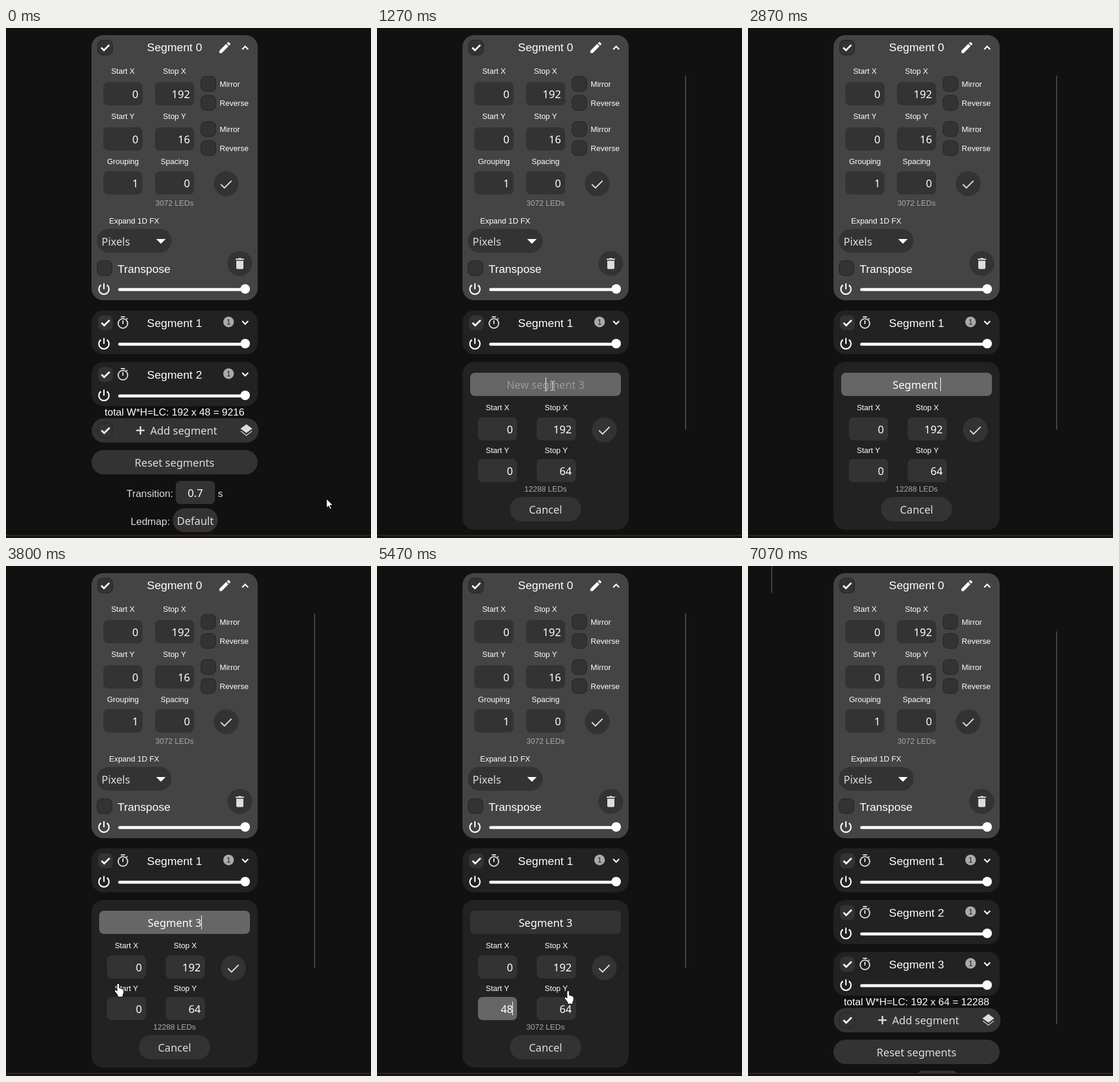
Write an HTML page that moves like this. It is 615x858 px and loops after 7.4 s.

```html
<!DOCTYPE html>
<html lang="en">
<head>
<meta charset="utf-8">
<title>Segments</title>
<style>
  html, body { margin: 0; width: 100%; height: 100%; overflow: hidden; background: #111; }
  svg { display: block; }
  text { font: 13px "Liberation Sans", Arial, sans-serif; fill: #fff; white-space: pre; }
  text.ui { font: 18px "Noto Sans", Tahoma, sans-serif; }
  .mid { text-anchor: middle; }
  .end { text-anchor: end; }
  .line { fill: none; stroke: #fff; stroke-width: 2; }
</style>
</head>
<body>
<svg id="stage" width="615" height="858" viewBox="0 0 615 858"></svg>
<script>
const rect = (x, y, w, h, r, fill, extra = '') =>
  `<rect x="${x}" y="${y}" width="${w}" height="${h}" rx="${r}" fill="${fill}" ${extra}/>`;
const circle = (x, y, r, fill, extra = '') => `<circle cx="${x}" cy="${y}" r="${r}" fill="${fill}" ${extra}/>`;
const text = (x, y, s, size = 13, cls = 'mid', fill = '#fff', extra = '') =>
  `<text x="${x}" y="${y}" class="${cls}" style="font-size:${size}px;fill:${fill}" ${extra}>${s}</text>`;
const ui = (x, y, s, cls = 'mid', fill = '#ddd', extra = '') => text(x, y, s, 18, 'ui ' + cls, fill, extra);
const line = (d, width = 2, stroke = '#fff') =>
  `<path class="line" d="${d}" style="stroke:${stroke};stroke-width:${width}"/>`;
const group = (id, body, extra = '') => `<g id="${id}" ${extra}>${body}</g>`;

const box = (x, y) => rect(x + .5, y + .5, 25, 25, 8, '#333', 'stroke="#222"');
const tick = (x, y) => line(`M${x - 6.5} ${y}l4.5 4.5 9-9`, 3);
const field = (x, y, value, id = '') =>
  rect(x, y, 66, 39, 8, '#333', id && `id="${id}Box"`) +
  ui(x + 59, y + 26.5, value, 'end', '#fff', id && `id="${id}"`);
const roundButton = (x, y, id = '') => circle(x, y, 21, '#333', id && `id="${id}"`);
const okButton = (x, y, id) => roundButton(x, y, id) + line(`M${x - 9} ${y + 1}l6 6 12-12`, 2, '#ddd');
const chevron = (y, dir) => line(`M398 ${y - 2.5 * dir}l5 ${5 * dir} 5 ${-5 * dir}`, 2.4);
const powerSlider = y =>
  line(`M160 ${y - 6.5}A8.5 8.5 0 1 0 170 ${y - 6.5}M165 ${y - 9.5}v10`, 2.2) +
  rect(189, y - 1.5, 214, 5, 2.5, '#fff') + circle(403, y, 8, '#fff');

function mainSegment() {
  const fields = [[91, 'Start X', 'Stop X', 0, 192], [167, 'Start Y', 'Stop Y', 0, 16], [241, 'Grouping', 'Spacing', 1, 0]];
  const labelY = [77, 153, 229];
  const flags = [[81, 'Mirror'], [113, 'Reverse'], [157, 'Mirror'], [189, 'Reverse']];
  return rect(144, 12, 280, 446, 20, '#444') + box(154, 20) + tick(167, 33) +
    text(284, 39, 'Segment 0', 19.2) +
    `<path transform="translate(356.5 20.5) scale(1.03)" fill="#fff" d="M3 17.25V21h3.75L17.8 9.9l-3.75-3.75zM20.7 7a1 1 0 0 0 0-1.4l-2.3-2.3a1 1 0 0 0-1.4 0l-1.9 1.8 3.8 3.75z"/>` +
    chevron(33.5, -1) +
    fields.map(([y, a, b, va, vb], i) =>
      text(197, labelY[i], a) + text(284, labelY[i], b) + field(164, y, va) + field(251, y, vb)).join('') +
    flags.map(([y, s]) => box(328, y) + text(360, y + 18, s, 13.1, '')).join('') +
    okButton(371, 262) + text(284, 299, '3072 LEDs', 13, 'mid', '#aaa') +
    text(216, 329, 'Expand 1D FX') + rect(153, 338, 126, 40, 20, '#333') + ui(161, 366, 'Pixels', '') +
    '<path d="M253 355h16l-8 8z" fill="#fff"/>' +
    roundButton(394, 396) +
    '<path d="M387 388h4l1-1h4l1 1h4v2h-14zM388 391.500h12v12q0 2-2 2h-8q-2 0-2-2z" fill="#ddd"/>' +
    box(153, 391) + text(188, 412, 'Transpose', 19, '') + powerSlider(439);
}

function segment(n) {
  return group('seg' + n, rect(144, 475, 280, 74, 20, '#222') + rect(155, 483.5, 25, 25, 8, '#333') + tick(167.5, 496) +
    circle(197, 497, 8, 'none', 'stroke="#ddd" stroke-width="2"') +
    line('M193.500 486h7M197 492v6M203 490l1.500-1.500', 2, '#ddd') +
    text(284, 503, 'Segment ' + n, 19.2) +
    circle(375, 494.5, 9, '#aaa') + text(375, 499, '1', 13, 'mid', '#222') +
    chevron(495.5, 1) + powerSlider(531), `transform="translate(0 ${87 * (n - 1)})"`);
}

const footer = group('footer',
  text(284, 652, '', 17, 'mid', '#fff', 'id="total"') +
  rect(144.5, 656.5, 281, 41, 20.5, '#333', 'id="addBar"') + box(154, 664) +
  group('addIcons', tick(167.5, 677) +
    '<path d="M405 667l9.500 7-9.500 7-9.500-7zM396 678l9 7 9-7 0.500 0.500-9.500 7.500-9.500-7.500z" fill="#ddd" stroke="#ddd" stroke-width=".6"/>') +
  line('M219.500 677h14M226.500 670v14', 2.6, '#ddd') + ui(243, 684, 'Add segment', '') +
  rect(144, 710, 280, 41, 20.5, '#333') + ui(284, 738, 'Reset segments') +
  text(203, 789, 'Transition:', 17, '', '#ddd') + rect(286, 762, 66, 39, 8, '#333') +
  ui(319, 789, '0.7', 'mid', '#fff') + text(357, 789, 's', 17, '', '#ddd') +
  text(210, 836, 'Ledmap:', 17, '', '#ddd') + rect(281, 808, 76, 40, 20, '#333') + ui(319, 836, 'Default'));

const form = group('form',
  rect(144, 562, 280, 282, 20, '#222') + rect(157, 580, 254, 39, 8, '#333', 'id="nameBox"') +
  ui(284, 607, '', 'mid', '#fff', 'id="name"') +
  text(203, 643, 'Start X') + text(302, 643, 'Stop X') + field(170, 655, 0) + field(269, 655, 192) +
  okButton(383, 676, 'ok') +
  text(203, 715, 'Start Y') + text(302, 715, 'Stop Y') + field(170, 725, 0, 'startY') + field(269, 725, 64) +
  text(284, 780, '', 13, 'mid', '#aaa', 'id="leds"') +
  rect(224, 789, 120, 41, 20.5, '#333') + ui(284, 817, 'Cancel') +
  rect(0, 0, 1, 23, 0, '#fff', 'id="caret"'));

const pointers =
  group('arrow', '<path d="M0 0V15.500L3.600 12 6 17.500 8.500 16.500 6 11H11Z" fill="#fff" stroke="#000"/>') +
  group('hand', '<path d="M-2 2Q0-1.500 2 2V8L5 8.500 8 10 9.500 12V16L8 19.500V23H-1V20L-6 13.500Q-6 10-4 11L-2 13Z" fill="#fff" stroke="#000"/>') +
  group('beam', line('M-3.500-7.500H-1L0-6.500 1-7.500H3.500M0-6.500V6.500M-3.500 7.500H-1L0 6.500 1 7.500H3.500', 1));

document.getElementById('stage').innerHTML =
  mainSegment() + segment(1) + segment(2) + segment(3) + footer + form +
  rect(519, 0, 2, 0, 0, '#444', 'id="thumb"') + rect(39, 0, 2, 45, 0, '#444', 'id="sideThumb"') +
  rect(0, 853, 615, 5, 0, '#1d100e') + rect(0, 853, 615, 1, 0, '#43352d') + pointers;

const LOOP = 7400, STEP = 1000 / 15;
// All tables below count in steps of 1/15 s.
const OPEN = 6, CLOSE = 93, ADDED = 97;
const NAME_FOCUS = 18, Y_FOCUS = 61;
const names = [[0, ''], [21, 'S'], [25, 'Se'], [26, 'Seg'], [29, 'Segem'], [34, 'Sege'], [35, 'Seg'], [38, 'Segm'],
  [39, 'Segme'], [40, 'Segmen'], [41, 'Segment'], [42, 'Segment '], [45, 'Segment 3']];
const startYs = [[0, '0'], [66, ''], [68, '4'], [76, '48']];
const paths = [
  [[0, 540, 792], [1, 526, 774], [2, 482, 738], [3, 425, 702], [4, 390, 684], [6, 383, 679], [9, 333, 685],
    [11, 333, 685], [15, 322, 640], [18, 300, 603], [20, 292, 600]],
  [[53, 284, 602], [55, 232, 650], [57, 189, 702], [60, 200, 738], [61, 206, 744], [64, 335, 745], [65, 335, 745]],
  [[74, 335, 745], [75, 335, 745]],
  [[79, 334, 742], [82, 322, 714], [84, 345, 698], [87, 382, 677], [88, 383, 677], [89, 384, 678], [97, 384, 678],
    [99, 340, 600], [101, 180, 330], [102, 60, 90]],
];

const $ = Object.fromEntries([...document.querySelectorAll('[id]')].map(el => [el.id, el]));
const show = (el, on) => { el.style.display = on ? '' : 'none'; };
const set = (el, attrs) => { for (const k in attrs) el.setAttribute(k, attrs[k]); };
const valueAt = (table, n) => table.findLast(([at]) => at <= n)[1];
const inside = (p, x, y, w, h) => p && p.x >= x && p.x <= x + w && p.y >= y && p.y <= y + h;

function pointerAt(n) {
  const path = paths.find(p => n >= p[0][0] && n <= p[p.length - 1][0]);
  if (!path) return null;
  const i = Math.max(1, path.findIndex(p => p[0] >= n));
  const [a, ax, ay] = path[i - 1], [b, bx, by] = path[i];
  const k = (n - a) / (b - a);
  return { x: Math.round(ax + (bx - ax) * k), y: Math.round(ay + (by - ay) * k) };
}

function drawPointer(p, open) {
  const inputs = [[157, 580, 254, 39], [170, 655, 66, 39], [269, 655, 66, 39], [170, 725, 66, 39], [269, 725, 66, 39]];
  const kind = !p ? '' : p.x > 520 ? 'arrow' : open && inputs.some(r => inside(p, ...r)) ? 'beam' : 'hand';
  for (const id of ['arrow', 'hand', 'beam']) {
    show($[id], id === kind);
    if (id === kind) set($[id], { transform: `translate(${p.x} ${p.y})` });
  }
}

function draw(n) {
  const open = n >= OPEN && n < CLOSE, added = n >= ADDED;
  const p = pointerAt(n);
  show($.form, open);
  show($.seg2, !open);
  show($.seg3, added);
  show($.footer, !open);
  show($.addIcons, n < OPEN || added);
  set($.footer, { transform: `translate(0 ${added ? 87 : 0})` });
  $.total.textContent = 'total W*H=LC: 192 x ' + (added ? '64 = 12288' : '48 = 9216');
  set($.addBar, { stroke: !open && !added && inside(p, 144, 656, 282, 42) ? '#5a5a5a' : 'none' });
  set($.ok, { stroke: inside(p, 364, 657, 38, 38) ? '#5a5a5a' : 'none' });

  const name = valueAt(names, n), startY = valueAt(startYs, n);
  const onName = n >= NAME_FOCUS && n < Y_FOCUS, onY = n >= Y_FOCUS;
  $.name.textContent = name || 'New segment 3';
  $.name.style.fill = name ? '#fff' : '#999';
  set($.nameBox, { fill: onName ? '#666' : '#333' });
  $.startY.textContent = startY;
  set($.startYBox, { fill: onY ? '#666' : '#333' });
  $.leds.textContent = 192 * (64 - startY) + ' LEDs';
  show($.caret, (onName || onY) && !(n >= 74 && n < 76));
  if (open) {
    const half = name ? $.name.getComputedTextLength() / 2 : 0;
    set($.caret, onY ? { x: 228, y: 733 } : { x: Math.round(284 + half), y: 588 });
  }

  const [top, bottom] = open ? [80, 676] : added ? [110, 771] : [102, 840];
  set($.thumb, { y: top, height: bottom - top });
  show($.thumb, n >= 2);
  show($.sideThumb, n >= 102);
  drawPointer(p, open);
}

const start = performance.now();
let last = -1;
function tickFrame() {
  const t = (performance.now() - start) % LOOP;
  const n = Math.floor((t + 4) / STEP) % 111;
  if (n !== last) draw(last = n);
  requestAnimationFrame(tickFrame);
}
tickFrame();
</script>
</body>
</html>
```
